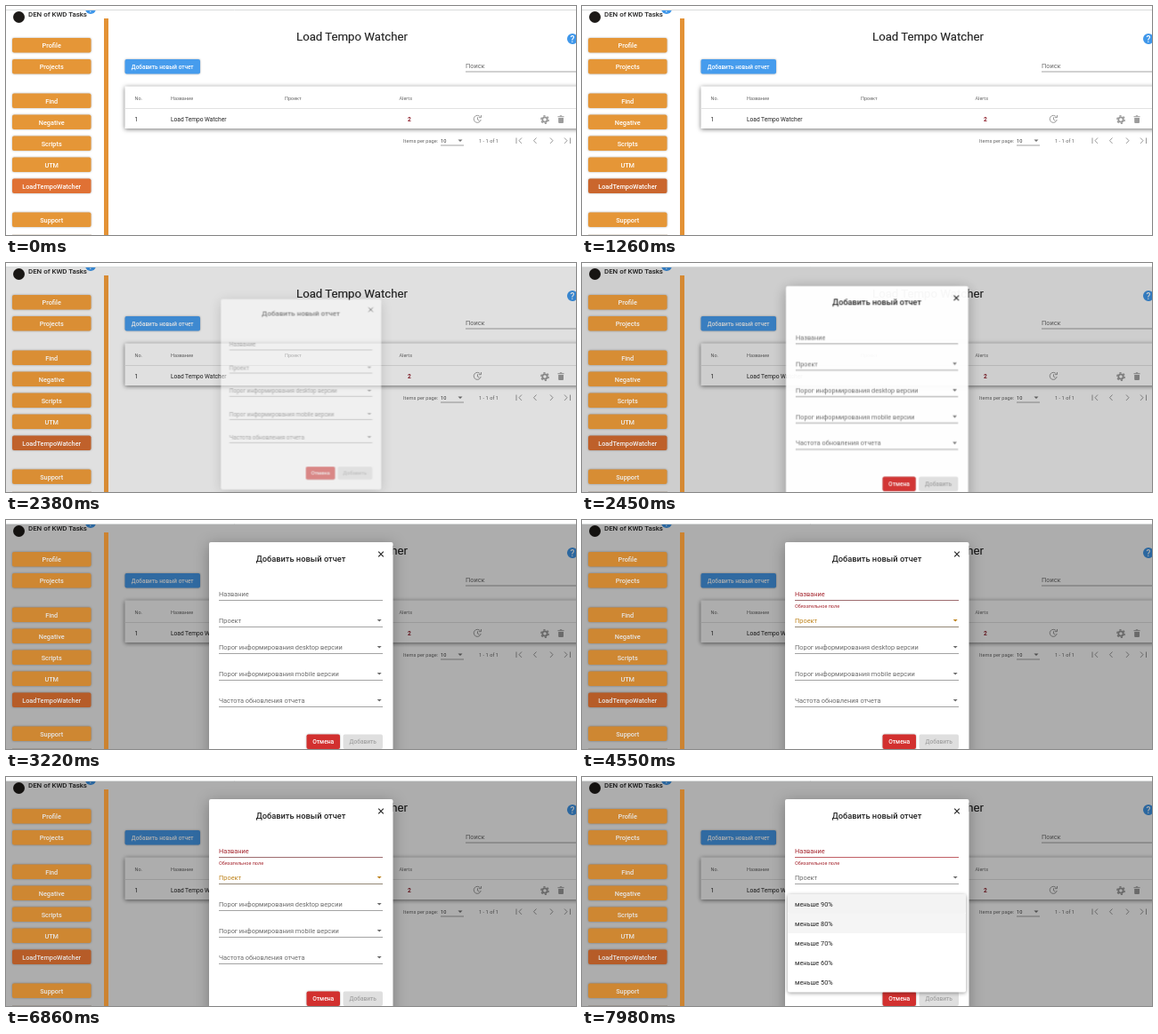
An HTML page that plays this animation: 640x258 px, repeating every 8000 ms.

```html
<!DOCTYPE html>
<html lang="ru">
<head>
<meta charset="utf-8">
<title>Отчеты</title>
<style>
html, body { margin: 0; width: 100%; height: 100%; overflow: hidden; background: #fff; }
svg { display: block; width: 100%; height: 100%; font: 400 7px Roboto, sans-serif; fill: #222; }
.mid { text-anchor: middle; }
.bold { font-weight: 500; }
.white { fill: #fff; }
.head { font-size: 5.5px; fill: #666; }
.small { font-size: 5.7px; fill: #666; }
.label { font-size: 7.4px; fill: #6c6c6c; }
.line { stroke: #8c8c8c; stroke-width: .8; }
.icon { fill: none; stroke: #999; stroke-width: 1; }
.lift { filter: drop-shadow(0 .7px .8px rgba(0, 0, 0, .32)); }
.card { filter: drop-shadow(0 1.5px 2.5px rgba(0, 0, 0, .55)); }
.deep { filter: drop-shadow(0 3px 8px rgba(0, 0, 0, .3)); }
.menu { filter: drop-shadow(0 1px 2px rgba(0, 0, 0, .4)); }

.current, #sidebar, #backdrop, #dialog, #panel, #hover, .field *, #error { animation: 8s linear infinite both; }
.current { animation-name: current; }
#sidebar { animation-name: shade; }
#backdrop { animation-name: dim; fill: #000; }
#dialog { animation-name: pop; transform-origin: 331px 148px; }
#panel { animation-name: unfold; transform-origin: 331px 143px; }
#hover { animation-name: hover; }
#error { animation-name: error; fill: #a5262f; font-size: 5.5px; }
#name .label { animation-name: nameLabel; transform-origin: 239px 76px; }
#name .line { animation-name: nameLine; }
#project .label, #project .arrow { animation-name: projectFill; }
#project .line { animation-name: projectLine; }
#desktop .label { animation-name: desktopLabel; transform-origin: 239px 134px; }
#desktop .line { animation-name: desktopLine; }
.arrow { fill: #6c6c6c; }

@keyframes current {
  0%, 1% { fill: #e07134; }
  7%, 100% { fill: #ca662d; }
}
@keyframes shade {
  0%, 28.9% { filter: brightness(1); }
  29.75% { filter: brightness(.95); }
  33.5%, 100% { filter: brightness(.9); }
}
@keyframes dim {
  0%, 28.9% { opacity: 0; }
  29.75% { opacity: .12; }
  31.5% { opacity: .26; }
  33.5%, 100% { opacity: .32; }
}
@keyframes pop {
  0%, 28.9% { opacity: 0; transform: scale(.72); }
  29.75% { opacity: .5; transform: scale(.87); }
  30.7%, 100% { opacity: 1; transform: none; }
}
@keyframes nameLabel {
  0%, 42.8% { fill: #6c6c6c; transform: none; }
  45%, 52% { fill: #c4851f; transform: translateY(-1px) scale(.75); }
  53.6%, 100% { fill: #a5262f; transform: none; }
}
@keyframes nameLine {
  0%, 42.8% { stroke: #8c8c8c; }
  45%, 52% { stroke: #c4851f; }
  52.6%, 91.8% { stroke: #86474b; }
  92.8%, 100% { stroke: #b0373e; }
}
@keyframes error {
  0%, 52% { opacity: 0; transform: translateY(-2px); }
  54.5%, 100% { opacity: 1; transform: none; }
}
@keyframes projectFill {
  0%, 52.3% { fill: #6c6c6c; }
  53.3%, 91.8% { fill: #be831c; }
  92.8%, 100% { fill: #6c6c6c; }
}
@keyframes projectLine {
  0%, 52.3% { stroke: #8c8c8c; }
  53.3%, 91.8% { stroke: #766752; }
  92.8%, 100% { stroke: #8c8c8c; }
}
@keyframes desktopLabel {
  0%, 91.8% { fill: #6c6c6c; transform: none; }
  95%, 100% { fill: #d88a24; transform: scale(.75); }
}
@keyframes desktopLine {
  0%, 91.8% { stroke: #8c8c8c; }
  93%, 100% { stroke: #d88a24; }
}
@keyframes unfold {
  0%, 91.8% { opacity: 0; transform: scaleY(.8); }
  93.4%, 100% { opacity: 1; transform: none; }
}
@keyframes hover {
  0%, 96.4% { opacity: 0; }
  96.5%, 100% { opacity: 1; }
}
</style>
</head>
<body>
<svg viewBox="0 0 640 258" preserveAspectRatio="none">
  <defs>
    <clipPath id="view"><rect y="4" width="640" height="254"/></clipPath>
    <g id="help">
      <circle r="6" fill="#3f97ea"/>
      <text class="mid bold white" y="3.6" font-size="10">?</text>
    </g>
  </defs>
  <rect width="640" height="258" fill="#fff"/>

  <g clip-path="url(#view)">
    <circle cx="14.5" cy="12.5" r="6.5" fill="#1d1a18"/>
    <text class="bold" x="25" y="11.5" font-size="7.9">DEN of KWD Tasks</text>
    <use href="#help" x="95" y="3"/>
    <path d="M7 257.5h89" stroke="#e6e0d8"/>

    <text class="mid" x="388.5" y="39" font-size="13.2" stroke="#222" stroke-width=".15">Load Tempo Watcher</text>
    <use href="#help" x="636" y="37"/>
    <rect class="lift" x="133.5" y="60" width="84.5" height="16.5" rx="2" fill="#469ced"/>
    <text class="mid bold white" x="175.7" y="70.7" font-size="6.45">Добавить новый отчет</text>
    <text class="label" x="516" y="69.5" font-size="7.9">Поиск</text>
    <path class="line" d="M516 74H640"/>

    <rect class="card" x="133.5" y="90.5" width="520" height="47.5" fill="#fff"/>
    <path d="M133.5 115.5H640" stroke="#e2e2e2"/>
    <g class="head">
      <text x="144.5" y="105.5">No.</text>
      <text x="185" y="105.5">Название</text>
      <text x="313" y="105.5">Проект</text>
      <text x="441.5" y="105.5">Alerts</text>
    </g>
    <g font-size="6.6">
      <text x="144.5" y="130">1</text>
      <text x="185" y="130">Load Tempo Watcher</text>
      <text x="451" y="130" font-weight="700" fill="#8e1f2b">2</text>
    </g>
    <g class="icon">
      <path d="M532.5 125a4 4 0 1 0 .7 3M533.5 123v2.7h-2.7M529.5 125.3v2.7l2 1.2"/>
      <circle cx="605" cy="128" r="2.7" stroke-width="1.8"/>
      <circle cx="605" cy="128" r="4.2" stroke-width="1.5" stroke-dasharray="2.2 2.198"/>
      <path d="M619.5 124.7h7M621.8 123.8h2.4"/>
    </g>
    <path d="M620.2 126h5.8v5a1 1 0 0 1-1 1h-3.8a1 1 0 0 1-1-1z" fill="#9c9c9c"/>

    <g class="small">
      <text x="446" y="153.5">Items per page:</text>
      <text x="488" y="153.5" fill="#333">10</text>
      <text x="531" y="153.5">1 - 1 of 1</text>
    </g>
    <path d="M507.5 150.5h5l-2.5 2.5z" fill="#737373"/>
    <path class="line" d="M488 157H514"/>
    <path class="icon" d="M573 148.5v6.5M579 148.5l-3 3.2 3 3.2M595.5 148.5l-3 3.2 3 3.2M611 148.5l3 3.2-3 3.2M627 148.5l3 3.2-3 3.2M633.5 148.5v6.5"/>
  </g>

  <rect id="backdrop" y="4" width="640" height="254"/>
  <path d="M0 4.5H640" stroke="#d9dcdc"/>
  <g id="sidebar">
    <rect x="110" y="14" width="5" height="244" fill="#e39236"/>
    <g id="nav"></g>
  </g>

  <g id="dialog">
    <rect class="deep" x="228" y="25" width="206.5" height="246" rx="2" fill="#fff"/>
    <text class="mid bold" x="331" y="46.7" font-size="9.3">Добавить новый отчет</text>
    <path d="M418.2 35.7l5.6 5.6M423.8 35.7l-5.6 5.6" stroke="#222" stroke-width="1.1"/>
    <g id="fields"></g>
    <text id="error" x="239" y="98.7">Обязательное поле</text>
    <rect class="lift" x="337.5" y="241.5" width="37.5" height="16.5" rx="2" fill="#d2302f"/>
    <text class="mid bold white" x="356.2" y="252.2" font-size="6.7">Отмена</text>
    <rect x="378.5" y="241.5" width="44.5" height="16.5" rx="2" fill="#dfdfdf"/>
    <text class="mid bold" x="400.7" y="252.2" font-size="6.6" fill="#a3a3a3">Добавить</text>
  </g>

  <g id="panel">
    <rect class="menu" x="231" y="132" width="200" height="110.5" rx="2" fill="#fff"/>
    <rect x="231" y="132" width="200" height="22" rx="2" fill="#f3f3f3"/>
    <rect id="hover" x="231" y="154" width="200" height="22" fill="#f5f5f5"/>
    <g id="options"></g>
  </g>
</svg>
<script>
const put = (id, items, draw) => {
  document.getElementById(id).innerHTML = items.map(draw).join('');
};

const nav = [['Profile', 36], ['Projects', 60], ['Find', 98.5], ['Negative', 122.5],
  ['Scripts', 146.5], ['UTM', 170.5], ['LoadTempoWatcher', 194.5], ['Support', 232.5]];
put('nav', nav, ([name, y]) => `
  <rect class="lift ${name === 'LoadTempoWatcher' ? 'current' : ''}" x="7" y="${y}" width="88.5" height="16.5" rx="2" fill="#e59637"/>
  <text class="mid bold white" x="51.2" y="${y + 11}" font-size="7.3">${name}</text>`);

const fields = [['name', 'Название'], ['project', 'Проект'],
  ['desktop', 'Порог информирования desktop версии'],
  ['mobile', 'Порог информирования mobile версии'],
  ['rate', 'Частота обновления отчета']];
put('fields', fields, ([id, label], i) => {
  const y = 90.5 + 30 * i;
  const arrow = i ? `<path class="arrow" d="M416.7 ${y - 8.5}h5l-2.5 2.5z"/>` : '';
  return `<g id="${id}" class="field">
    <text class="label" x="239" y="${y - 4.5}">${label}</text>${arrow}
    <path class="line" d="M239 ${y}H423"/></g>`;
});

put('options', [90, 80, 70, 60, 50], (n, i) =>
  `<text x="239" y="${146 + 22 * i}" font-size="7.3">меньше ${n}%</text>`);
</script>
</body>
</html>
```
